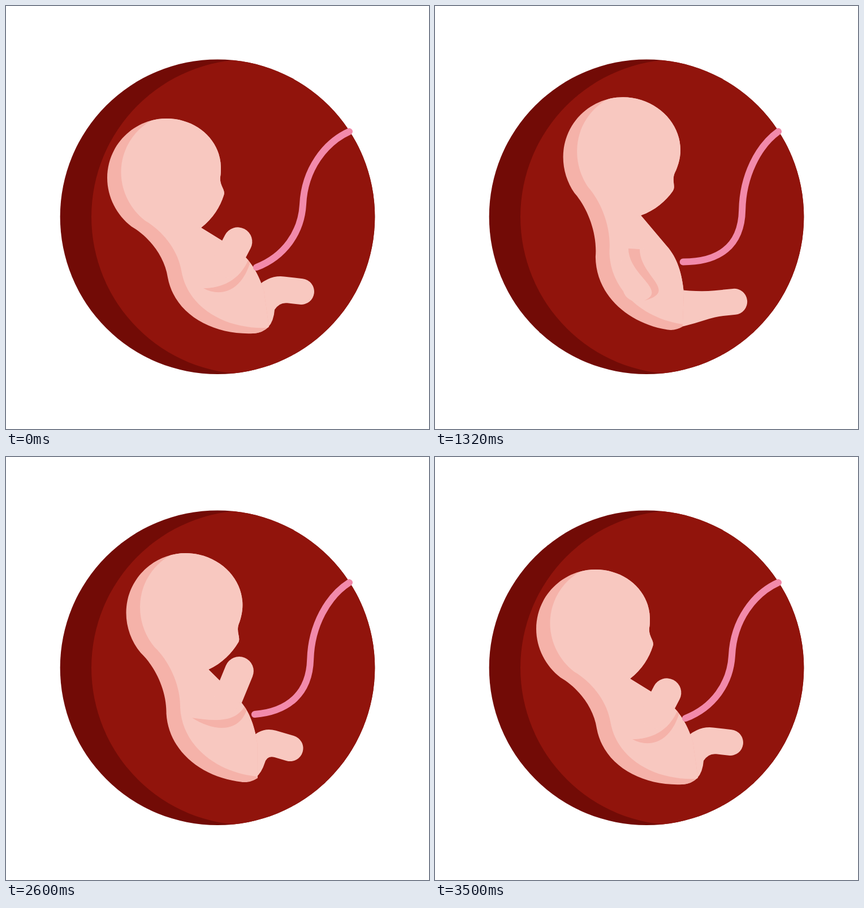
An HTML page that plays this animation: 748 by 748 pixels, repeating every 3520 ms.

```html
<!DOCTYPE html>
<html lang="en">
<head>
<meta charset="utf-8">
<title>Womb</title>
<style>
  html, body { margin: 0; width: 100%; height: 100%; overflow: hidden; background: #fff; }
  svg { display: block; width: 100%; height: 100%; }
  .skin { fill: #f8c8c0; }
  .shade { fill: #f5b2a9; }
  #arm { stroke: #f8c8c0; stroke-width: 51; stroke-linecap: round; }
  #cord { fill: none; stroke: #f28aab; stroke-width: 12; stroke-linecap: round; }
</style>
</head>
<body>
<svg viewBox="0 0 748 748">
  <defs>
    <path id="body"/>
    <clipPath id="disc"><circle cx="374" cy="372.8" r="278.3"/></clipPath>
    <clipPath id="inBody"><use href="#body"/></clipPath>
  </defs>
  <circle cx="374" cy="372.8" r="278.3" fill="#720b06"/>
  <circle cx="429.3" cy="372.8" r="278.3" fill="#91140c" clip-path="url(#disc)"/>
  <path id="leg" class="skin"/>
  <use href="#body" class="shade"/>
  <g clip-path="url(#inBody)"><use href="#body" class="skin" x="24.5" y="-10"/></g>
  <path id="arm"/>
  <g clip-path="url(#inBody)"><path id="fold" class="shade"/></g>
  <path id="cord"/>
</svg>
<script>
const LOOP = 3520, RAD = Math.PI / 180;
const HIP = [422, 444], SHOULDER = [350, 450];

const BODY = `M345 392C366 376 379 354 385 335C389 325 377 318 379 302
  C380 297 380 291 380 285C379 236 336 199 284 199C226 199 179 246 179 304
  C179 338 196 370 222 390C250 406 280 440 286 480C298 545 365 582 437 579
  C448 579 457 574 465 567L456 503C445 469 428 443 405 429Z`;

// foot x, y, tilt, crotch x, y, hip curve x, y
const LEG = {
  curled: [522, 505, 6.5, 475, 537, 472, 577],
  tucked: [491, 521, 22, 447, 544, 432, 573],
  kick: [34, 4, -25.6, 28, 12, 3, -6]
};

// hand angle, reach, elbow x, y, fold (tip, two handles, end), fold depth x, y
const ARM = {
  rest: [-29, 68.5, 390, 455, 349, 499, 380, 516, 415, 504, 431, 456, -1, -17],
  down: [81, 48, 355, 450, 370, 521, 432, 504, 362, 478, 362, 430, -20, -2],
  up: [-49, 95, 394, 423, 329, 461, 365, 484, 415, 492, 428, 440, -1, -18]
};

const CORD = {
  curled: [565, 241, 528, 288, 525, 351, 522, 401, 492, 443, 443, 462],
  upright: [572, 249, 547, 303, 546, 362, 545, 428, 504, 454, 438, 451]
};

// Motion as [time, values] steps, eased in between
const BEND = [[475, [0]], [1745, [1.17]], [1780, [1.17]], [3510, [0]]];
const KICK = [[500, [0]], [980, [1]], [1350, [1]], [2150, [0]]];
const SWING = [[500, ARM.rest], [1300, ARM.down], [1330, ARM.down],
  [2420, ARM.up], [2560, ARM.up], [3450, ARM.rest]];

const $ = id => document.getElementById(id);
const shape = (id, d) => $(id).setAttribute('d', d);
const clamp = x => Math.min(1, Math.max(0, x));
const ease = x => x * x * (3 - 2 * x);
const mix = (a, b, u) => a.map((v, i) => v + (b[i] - v) * u);

function tween(steps, t) {
  const i = steps.findIndex(s => s[0] > t);
  if (i < 0) return steps[steps.length - 1][1];
  if (i === 0) return steps[0][1];
  const [t0, a] = steps[i - 1], [t1, b] = steps[i];
  return mix(a, b, ease((t - t0) / (t1 - t0)));
}

// Turns a point about the hip; the lower body turns less and tightens
function lean(x, y, u) {
  const low = clamp((y - 400) / 180);
  const angle = 20.5 * RAD * u * (1 - .35 * low);
  const size = 1 + u * (.01 - .07 * low);
  const c = Math.cos(angle) * size, s = Math.sin(angle) * size;
  const dx = x - HIP[0], dy = y - HIP[1];
  return [HIP[0] + dx * c - dy * s, HIP[1] + dx * s + dy * c];
}

function drawLeg(u, kick) {
  const rest = mix(LEG.curled, LEG.tucked, u);
  const [x, y, tilt, gx, gy, hx, hy] = rest.map((v, i) => v + LEG.kick[i] * kick);
  const c = Math.cos(tilt * RAD), s = Math.sin(tilt * RAD), r = 23;
  // Point beside the foot: back along the shin, side -1 above and 1 below
  const at = (back, side) => [x - back * c - side * r * s, y - back * s + side * r * c];
  shape('leg', `M${lean(440, 500, u)}Q${at(61, -1)} ${at(33, -1)}L${at(0, -1)}
    A${r} ${r} 0 0 1 ${at(0, 1)}L${at(22, 1)}Q${at(36, 1)} ${gx} ${gy}
    Q${hx} ${hy} ${lean(437, 579, u)}L${lean(400, 540, u)}Z`);
}

function drawArm([angle, reach, ex, ey, tx, ty, ax, ay, bx, by, x, y, dx, dy]) {
  const hx = SHOULDER[0] + reach * Math.cos(angle * RAD);
  const hy = SHOULDER[1] + reach * Math.sin(angle * RAD);
  shape('arm', `M${ex} ${ey}L${hx} ${hy}`);
  shape('fold', `M${tx} ${ty}C${ax} ${ay} ${bx} ${by} ${x} ${y}l${dx} ${dy * .65}
    C${bx + dx} ${by + dy} ${ax + dx} ${ay + dy} ${tx} ${ty}Z`);
}

function draw(t) {
  const [u] = tween(BEND, t), [kick] = tween(KICK, t);
  shape('body', BODY.replace(/(\d+) (\d+)/g, (_, x, y) => lean(+x, +y, u).join(' ')));
  shape('cord', 'M607 222C' + mix(CORD.curled, CORD.upright, u).join(' '));
  drawLeg(u, kick);
  drawArm(tween(SWING, t));
}

const start = performance.now();
function tick() {
  draw((performance.now() - start) % LOOP);
  requestAnimationFrame(tick);
}
tick();
</script>
</body>
</html>
```
